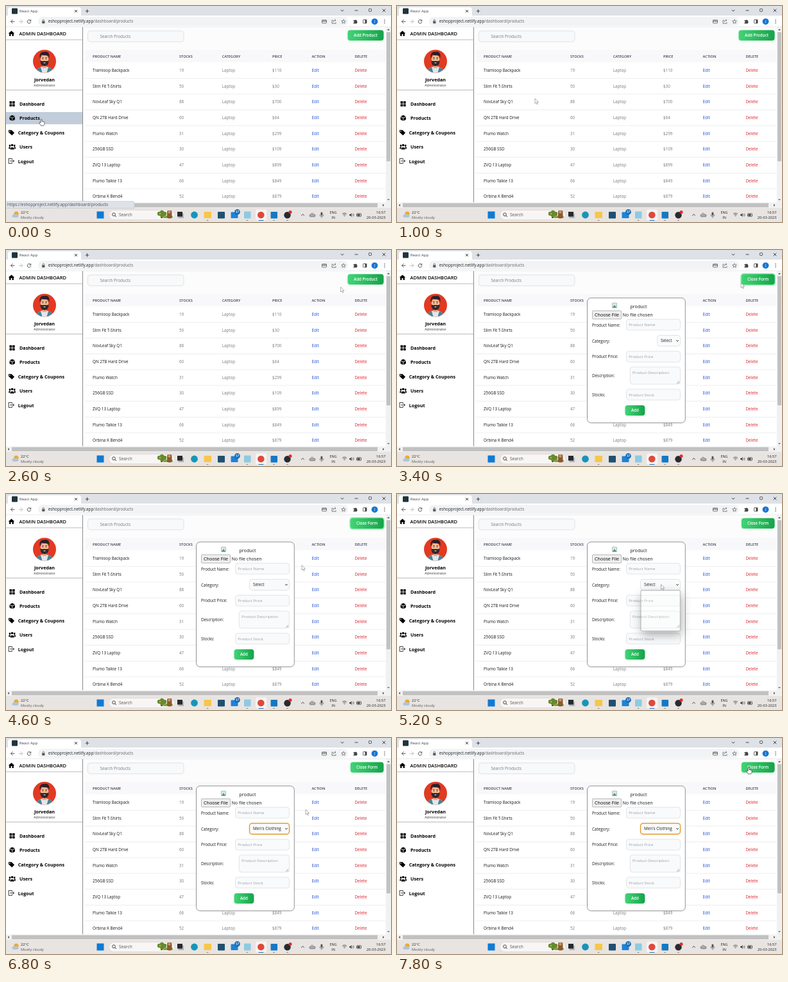
Animation of 600 by 338 pixels, one loop 8000 ms. Source, as an HTML page with a canvas:

```html
<!DOCTYPE html>
<html lang="en">
<head>
<meta charset="utf-8">
<title>Admin dashboard</title>
<style>
html, body { margin: 0; width: 100%; height: 100%; overflow: hidden; background: #fff; }
canvas { display: block; width: 600px; height: 338px; }
</style>
</head>
<body>
<canvas id="stage" width="600" height="338"></canvas>
<script>
const ctx = document.getElementById('stage').getContext('2d');
const LOOP = 8000, STEP = 200;
const INK = '#15181d', GRAY = '#757981', LINE = '#e4e6ea';

const products = [
  ['Tramloop Backpack', 19, 110], ['Slim Fit T-Shirts', 50, 30], ['NovLeaf Sky Q1', 88, 700],
  ['QN 2TB Hard Drive', 60, 64], ['Plumo Watch', 31, 299], ['256GB SSD', 30, 109],
  ['ZVQ 13 Laptop', 47, 899], ['Plumo Talkie 13', 66, 849], ['Orbina K Bend4', 52, 879]
];
const options = ['Select', 'Laptop', 'Smartphone', "Men's Clothing", 'Smartwatch', 'Electronics', 'Camera'];

// Pointer tip: [time, x, y]
const path = [
  [0, 55, 177], [400, 55, 177], [600, 70, 173], [1000, 215, 145], [1400, 390, 104], [1800, 466, 88.5],
  [2600, 521.5, 58], [3000, 546, 47], [3200, 544, 48], [3400, 536, 51.5], [3800, 527, 60], [4000, 527, 60],
  [4400, 492, 90], [4800, 430, 133], [5000, 413, 141], [5200, 411.5, 141.5], [5400, 412, 147],
  [6000, 425.5, 179], [6200, 425.5, 179], [6600, 437, 138], [7200, 527, 60], [7600, 547, 47], [7800, 548, 46]
];

function pointerAt(t) {
  const i = path.findIndex(p => p[0] >= t);
  if (i <= 0) return { x: path[0][1], y: path[0][2] };
  const [t0, x0, y0] = path[i - 1], [t1, x1, y1] = path[i];
  const k = (t - t0) / (t1 - t0);
  return { x: x0 + (x1 - x0) * k, y: y0 + (y1 - y0) * k };
}

function text(str, x, y, size, color = INK, weight = 400, align = 'left') {
  ctx.font = `${weight} ${size}px "Open Sans", "Noto Sans", sans-serif`;
  ctx.textAlign = align;
  ctx.fillStyle = color;
  ctx.fillText(str, x, y + size * 0.36);
}

function rect(x, y, w, h, color) {
  ctx.fillStyle = color;
  ctx.fillRect(x, y, w, h);
}

function box(x, y, w, h, r, fill, stroke, width = 0.6) {
  ctx.beginPath();
  ctx.roundRect(x, y, w, h, r);
  if (fill) { ctx.fillStyle = fill; ctx.fill(); }
  if (stroke) { ctx.strokeStyle = stroke; ctx.lineWidth = width; ctx.stroke(); }
}

function disc(x, y, r, fill, stroke, width = 0.8) {
  ctx.beginPath();
  ctx.arc(x, y, r, 0, Math.PI * 2);
  if (fill) { ctx.fillStyle = fill; ctx.fill(); }
  if (stroke) { ctx.strokeStyle = stroke; ctx.lineWidth = width; ctx.stroke(); }
}

function shape(d, x, y, fill, stroke, width = 0.9) {
  const p = new Path2D(d);
  ctx.save();
  ctx.translate(x, y);
  if (fill) { ctx.fillStyle = fill; ctx.fill(p); }
  if (stroke) { ctx.strokeStyle = stroke; ctx.lineWidth = width; ctx.stroke(p); }
  ctx.restore();
}

function greenButton(label, x, y, w, h, glow) {
  const g = ctx.createLinearGradient(x, 0, x + w, 0);
  g.addColorStop(0, '#43d477');
  g.addColorStop(1, '#16a34a');
  if (glow) box(x - 1.5, y - 1.5, w + 3, h + 3, 5, '#9beeb8');
  ctx.save();
  ctx.shadowColor = 'rgba(34,197,94,.25)';
  ctx.shadowBlur = 3;
  ctx.shadowOffsetY = 1;
  box(x, y, w, h, 4, g);
  ctx.restore();
  text(label, x + w / 2, y + h / 2, 6.2, '#fff', 600, 'center');
}

function browserBar() {
  rect(0, 0, 600, 15, '#dee1e6');
  box(3, 2, 114, 15, [4, 4, 0, 0], '#fff');
  box(9, 3.5, 9, 9, 1, '#20343c');
  text('React App', 21, 8, 6, '#3c4043');
  shape('M-2-2L2 2M2-2L-2 2', 109, 8, null, '#333');
  shape('M-2.7 0H2.7M0-2.7V2.7', 126.5, 8, null, '#333');
  shape('M-2.3-1L0 1.2L2.3-1', 524, 7, null, '#333');
  shape('M-2.5 0H2.5', 546, 7, null, '#333');
  box(565.5, 4.5, 4, 4, 0.8, null, '#333', 0.8);
  shape('M-2.3-2.3L2.3 2.3M2.3-2.3L-2.3 2.3', 589, 7, null, '#333');

  rect(0, 15, 600, 18, '#fff');
  box(50, 17, 483, 14, 7, '#f1f3f4');
  shape('M3 0H-3M0-3L-3 0L0 3', 10.5, 24.3, null, '#444');
  shape('M-3 0H3M0-3L3 0L0 3', 23, 24.3, null, '#b5b8bc');
  shape('M2.2-1.7A2.8 2.8 0 1 0 2.8.6M2.8-3V-.9H.7', 36, 24.3, null, '#444');
  box(56.2, 23.5, 4.2, 3.8, 0.6, '#555');
  shape('M-1.3 0V-1.2A1.3 1.3 0 0 1 1.3-1.2V0', 58.3, 23.7, null, '#555', 0.7);
  text('eshopproject.netlify.app', 65.8, 24.2, 6.25, '#202124');
  const host = ctx.measureText('eshopproject.netlify.app').width;
  text('/dashboard/products', 65.8 + host, 24.2, 6.25, '#62666b');
  box(492.5, 21.8, 7, 5, 0.7, null, '#555', 0.8);
  rect(492.5, 23, 7, 1.2, '#555');
  shape('M-1-2H-3V3H3V1M-1 1C-1-1 0-2 3-2M1.4-3.5L3-2L1.4-.4', 511, 24.3, null, '#555', 0.7);
  shape('M0-3.2L1-1L3.3-.9L1.5.6L2.1 2.9L0 1.6L-2.1 2.9L-1.5.6L-3.3-.9L-1-1Z', 526, 24.3, null, '#555', 0.7);
  shape('M-3-1.7H-.9A1.1 1.1 0 0 1 1.2-1.7H2.4V.1A1.1 1.1 0 0 1 2.4 2.2V3.4H-3V2A1.1 1.1 0 0 0-3-.3Z', 544.5, 24, '#444');
  box(556.5, 21.5, 5.5, 5.5, 0.5, null, '#444', 0.8);
  rect(559.5, 21.5, 2.5, 5.5, '#444');
  disc(574.5, 24.3, 4.9, '#1976d2');
  text('J', 574.5, 24.3, 5.5, '#fff', 400, 'center');
  for (const y of [21.8, 24.3, 26.8]) disc(590, y, 0.7, '#444');
  rect(0, 32.5, 600, 0.6, '#d6d8db');
}

function avatar() {
  ctx.save();
  disc(60, 86.5, 18, '#e23a22');
  ctx.clip();
  shape('M-13 19C-13 10-7 9-4 8H4C7 9 13 10 13 19Z', 60, 87, '#dfe8ee');
  shape('M-13 19C-13 12-10 10-6 8.7L-3 19ZM13 19C13 12 10 10 6 8.7L3 19Z', 60, 87, '#4c8295');
  rect(57, 89, 6, 8, '#e8a782');
  ctx.beginPath();
  ctx.ellipse(60, 84.5, 6.4, 8.5, 0, 0, Math.PI * 2);
  ctx.fillStyle = '#f4bb94';
  ctx.fill();
  shape('M-7-2C-9-9-5-13 0-12C6-14 9-8 7-2L6-6C3-7-2-6-5-8Z', 60, 84, '#29202a');
  shape('M-6.5 0C-6 3-3 2 0 2C3 2 6 3 6.5 0C7 8 3 10 0 10C-3 10-7 8-6.5 0Z', 60, 84, '#35262a');
  shape('M-2 4.5H2C1 6-1 6-2 4.5Z', 60, 84, '#fff');
  disc(57.5, 83, 0.7, '#29202a');
  disc(62.5, 83, 0.7, '#29202a');
  shape('M-4-3H-1.3M1.3-3H4', 60, 84, null, '#29202a');
  ctx.restore();
}

function sidebar(hovered) {
  rect(0, 33, 119, 274, '#fff');
  shape('M-4.7 0L0-4.3L4.7 0H3.4V4H1V1H-1V4H-3.4V0Z', 8.5, 43, '#000');
  text('ADMIN DASHBOARD', 20.5, 43.2, 7.5, '#000', 600);
  rect(0, 52.5, 119, 0.8, '#a9a9a9');
  avatar();
  text('Jorvedan', 60, 115, 7.2, '#000', 700, 'center');
  text('Administrator', 60, 124.3, 5.2, '#333', 400, 'center');
  rect(0, 131.2, 119, 0.8, '#a9a9a9');
  if (hovered) rect(0, 166, 119, 19, '#c1cddb');

  for (const x of [5.5, 10]) for (const y of [149, 153.5]) box(x, y, 3.7, 3.7, 0.6, '#000');
  shape('M0-4.5L4-2.5L0-.5L-4-2.5ZM-4.2-1.7L-.4.2V4.5L-4.2 2.5ZM4.2-1.7L.4.2V4.5L4.2 2.5Z', 9.7, 175.3, '#000');
  shape('M-4.5-4H0L4.6.5L.8 4.5L-4.5-.5ZM-2.7-1.3A.8.8 0 1 0-2.7-2.9A.8.8 0 1 0-2.7-1.3Z', 8.5, 198, '#000');
  for (const [x, y, r] of [[6, 218.5, 1.4], [13.2, 218.5, 1.4], [9.6, 217.8, 1.8]]) disc(x, y, r, '#000');
  shape('M-3 4V2.5C-3 0 3 0 3 2.5V4ZM-5.3 3V1.5C-5.3 0-3.8-.3-3-.1L-3.6 3ZM5.3 3V1.5C5.3 0 3.8-.3 3-.1L3.6 3Z', 9.6, 220.5, '#000');
  shape('M1-1.8V-3.8H-4.2V3.8H1V1.8M-2 0H4.5M2.4-2L4.5 0L2.4 2', 8.3, 242.5, null, '#222');

  const items = [['Dashboard', 21], ['Products', 21], ['Category & Coupons', 18.7], ['Users', 21], ['Logout', 18.7]];
  items.forEach(([label, x], i) => text(label, x, 153 + i * 22.5, 7.2, '#000', 700));
  rect(119, 33, 1, 274, '#8b8b8b');
}

function table() {
  rect(120, 33, 472, 274, '#fcfcfc');
  box(127.5, 39, 149.5, 17, 4, '#f8f9fa', '#cfd2d6');
  text('Search Products', 146.5, 47.5, 6.3, GRAY);
  rect(123.5, 69, 468, 19, '#f8f8fa');
  rect(123.5, 88, 468, 219, '#fff');
  const heads = ['PRODUCT NAME', 'STOCKS', 'CATEGORY', 'PRICE', 'ACTION', 'DELETE'];
  const cols = [135, 270, 336.7, 415, 476.5, 543.5];
  heads.forEach((h, i) => text(h, cols[i], 78.7, 5.6, '#374151', 600));
  products.forEach(([name, stock, price], i) => {
    const y = 100.6 + i * 24.7;
    const cells = [name, stock, 'Laptop', '$' + price, 'Edit', 'Delete'];
    const colors = [INK, GRAY, GRAY, GRAY, '#1d4ed8', '#dc1f2b'];
    cells.forEach((c, k) => text(c, cols[k], y, 6.3, colors[k], k === 0 || k > 3 ? 500 : 400));
    if (i < 8) rect(123.5, y + 12.2, 468, 0.7, LINE);
  });
}

function scrollbars() {
  rect(592, 33, 8, 275, '#f1f1f1');
  rect(593, 41, 6, 202, '#c1c1c1');
  rect(0, 307.5, 600, 8.5, '#f1f1f1');
  rect(9, 308.5, 570, 6.5, '#c1c1c1');
  shape('M-2 1L0-1.3L2 1Z', 596, 37, '#555');
  shape('M-2-1L0 1.3L2-1Z', 596, 303, '#777');
  shape('M1-2L-1.3 0L1 2Z', 4, 311.7, '#555');
  shape('M-1-2L1.3 0L-1 2Z', 588, 311.7, '#555');
}

function searchArt() {
  box(244, 328, 16, 4, 2, '#86a447');
  shape('M0 5L1-2H2.5L3 5Z', 241, 327, '#7a4c23');
  for (const [x, y] of [[239, 325], [243, 323], [247, 325], [243, 327]]) disc(x, y, 3.2, '#658b2e');
  disc(240, 325, 1.2, '#e5a63a');
  box(251, 320, 7.5, 12.5, 2, '#8d5a31');
  disc(254.5, 322.5, 2.2, '#c99862');
}

function taskbar() {
  rect(0, 316, 600, 22, '#e8e4e1');
  disc(16, 325, 3.6, '#f6a821');
  box(9.5, 326, 10, 5, 2.5, '#a9c6e4');
  text('22°C', 23, 323, 5.7, '#222');
  text('Mostly cloudy', 23, 331, 5.6, '#555');

  rect(141.5, 321.5, 11, 11, '#0f7bd6');
  box(160.5, 319.5, 102, 15, 7.5, '#f8f6f5', '#d8d4d1');
  disc(168, 326.2, 2.4, null, '#222');
  shape('M0 0L2 2', 169.8, 328, null, '#222');
  text('Search', 176, 327, 6.6, '#555');
  searchArt();

  rect(268.5, 324.5, 8.5, 7.5, '#b1b5b9');
  rect(267, 322, 8, 7.5, '#252a2e');
  disc(293.5, 327, 5.4, '#1795b8');
  box(308.5, 322, 11.5, 10, 1, '#f7c64a');
  box(330, 322, 11, 10.5, 1, '#20506f');
  box(350.5, 322.5, 11, 9.5, 1, '#1b83d8');
  disc(360.5, 322.3, 4.3, '#1268b4');
  text('37', 360.5, 322.3, 5, '#fff', 600, 'center');
  box(371, 321.5, 10.5, 11, 1, '#8dcbe2');
  box(389, 318.5, 17, 17, 2, '#f6f4f3');
  disc(397.3, 327, 5.3, '#e0483b');
  box(412.5, 322, 10.5, 10.5, 1, '#1479c4');
  disc(438.5, 327.3, 5.2, '#292a30');
  disc(443, 322.5, 2.5, '#e12a2a');
  for (const x of [314, 376, 417.5, 438.5]) box(x - 1.5, 335, 3, 1, 0.5, '#888');
  box(393.5, 335, 8, 1, 0.5, '#1674c9');

  shape('M-2.3 1L0-1.2L2.3 1', 462.5, 327, null, '#333');
  box(473, 326, 9, 3.8, 1.9, '#a6aaad', '#555', 0.6);
  disc(477, 325.7, 2.3, '#a6aaad');
  box(490.4, 322.5, 3, 5.5, 1.5, '#555');
  shape('M-3 0A3 3 0 0 0 3 0M0 3V5', 491.9, 326.5, null, '#555', 0.7);
  text('ENG', 510, 323, 5.5, '#222', 400, 'center');
  text('IN', 510, 331, 5.5, '#222', 400, 'center');
  shape('M-3.5-1.5A5 5 0 0 1 3.5-1.5M-2 0A3 3 0 0 1 2 0M-.7 1.5H.7', 527.5, 327, null, '#333', 0.8);
  shape('M-3-1H-1.5L.5-3V3L-1.5 1H-3Z', 538, 327, '#444');
  shape('M1.7-1.5A2 2 0 0 1 1.7 1.5M3-2.6A3.7 3.7 0 0 1 3 2.6', 538, 327, null, '#444', 0.6);
  box(546.5, 324.8, 7, 4.5, 1, null, '#333', 0.8);
  rect(547.5, 325.8, 4.2, 2.5, '#333');
  text('16:57', 591.5, 323, 5.7, '#222', 400, 'right');
  text('20-03-2023', 591.5, 331, 5.7, '#222', 400, 'right');
}

function field(label, placeholder, x, y, h, labelY) {
  text(label, 304, labelY, 6.3, INK, 500);
  box(x, y, 441.5 - x, h, 4, '#f9fafb', '#cfd3d9');
  text(placeholder, x + 3.8, y + (h > 20 ? 9 : h / 2), 6.15, '#9a9fa8');
}

function form(t) {
  box(296.5, 75, 152.8, 195.5, 6, '#fff', '#777', 0.8);
  box(335.5, 83, 7, 7.5, 0.5, '#d9e7fb', '#8f9398');
  shape('M-3 3L0-1L3 3Z', 339, 87, '#43a047');
  text('product', 363.5, 88.7, 7.1);
  box(304.5, 95, 45, 13, 1.2, '#efefef', '#8c8c8c');
  text('Choose File', 327, 101.5, 7.1, '#000', 400, 'center');
  text('No file chosen', 351.5, 101.5, 7.1);
  field('Product Name:', 'Product Name', 357.5, 108.3, 17, 117.3);
  field('Product Price:', 'Product Price', 357.5, 158.3, 17, 167);
  field('Description:', 'Product Description', 363.3, 183, 27, 196.8);
  shape('M-3 2L1-2M-.5 2L1 .5', 439, 207, null, '#666', 0.6);
  field('Stocks:', 'Product Stock', 357.5, 217.8, 17, 226.5);
  greenButton('Add', 355.5, 243, 30.8, 16);

  text('Category:', 304, 142.3, 6.3, INK, 500);
  const chosen = t >= 6200, left = t >= 3600 ? 379.5 : 405.5;
  box(left, 133.5, 441.5 - left, 17, 4, '#f9fafb', chosen ? '#e8962a' : '#cfd3d9', chosen ? 1.4 : 0.6);
  text(chosen ? options[3] : 'Select', left + 5.5, 142, 6.4, '#222');
  shape('M-1.8-.9L0 1L1.8-.9', 437, 142, null, '#222');
}

function dropdown(t, pointer) {
  const ready = t >= 5400, frame = [380, 150.8, 61.3, 63.4];
  // The shadow falls only outside the panel, so a fading panel stays clear.
  ctx.save();
  ctx.beginPath();
  ctx.rect(0, 0, 600, 338);
  ctx.rect(...frame);
  ctx.clip('evenodd');
  ctx.shadowColor = 'rgba(0,0,0,.32)';
  ctx.shadowBlur = 16;
  ctx.shadowOffsetX = 2;
  ctx.shadowOffsetY = 6;
  box(...frame, 1, '#fff');
  ctx.restore();
  box(...frame, 1, ready ? '#fff' : 'rgba(255,255,255,.25)', ready ? '#888' : '#999', 0.7);
  if (!ready) return;
  const active = Math.max(0, Math.min(6, Math.floor((pointer.y - 151) / 9.05)));
  options.forEach((label, i) => {
    const y = 151.2 + i * 9.05;
    if (i === active) rect(380.4, y, 60.5, 9, '#1a80e6');
    text(label, 385.5, y + 4.5, 6.3, i === active ? '#fff' : '#222');
  });
}

function drawPointer({ x, y }, hand) {
  if (hand) {
    shape('M-1 1C-1-.4 1-.4 1 1V4C2 3.3 3 3.7 3 4.4C4 3.9 5 4.4 5 5.2V7.2C5 9 4 9.8 3.8 10.2H-.7C-1.3 8.7-3 7-3.3 6C-3.4 5-2 4.8-1 6Z', x, y, '#fff', '#333', 0.7);
  } else {
    shape('M0 0V7.6L1.8 6L3 8.8L4.3 8.3L3.2 5.5H5.6Z', x, y, '#fff', '#777', 0.6);
  }
}

function draw(t) {
  const pointer = pointerAt(t), { x, y } = pointer;
  const onMenu = x < 119 && y > 166 && y < 185;
  const open = t >= 3000;
  const buttonX = open ? 536.8 : 532.5;
  const onButton = x > buttonX + 1 && y > 38 && y < 54;
  ctx.clearRect(0, 0, 600, 338);
  browserBar();
  table();
  sidebar(onMenu);
  greenButton(open ? 'Close Form' : 'Add Product', buttonX, 37.7, 588.5 - buttonX, 16.4, open && t < 5000);
  if (open) form(t);
  scrollbars();
  taskbar();
  if (onMenu) {
    box(-1, 305.5, 201, 11, [0, 3, 0, 0], '#dee1e6', '#c2c5c9');
    text('https://eshopproject.netlify.app/dashboard/products', 2, 310.7, 6.4, '#4a4e53');
  }
  if (t >= 5200 && t < 6200) dropdown(t, pointer);
  drawPointer(pointer, onMenu || onButton);
}

function tick(now) {
  const t = now % LOOP;
  draw(Math.floor(t / STEP) * STEP);
  requestAnimationFrame(tick);
}
requestAnimationFrame(tick);
</script>
</body>
</html>
```
